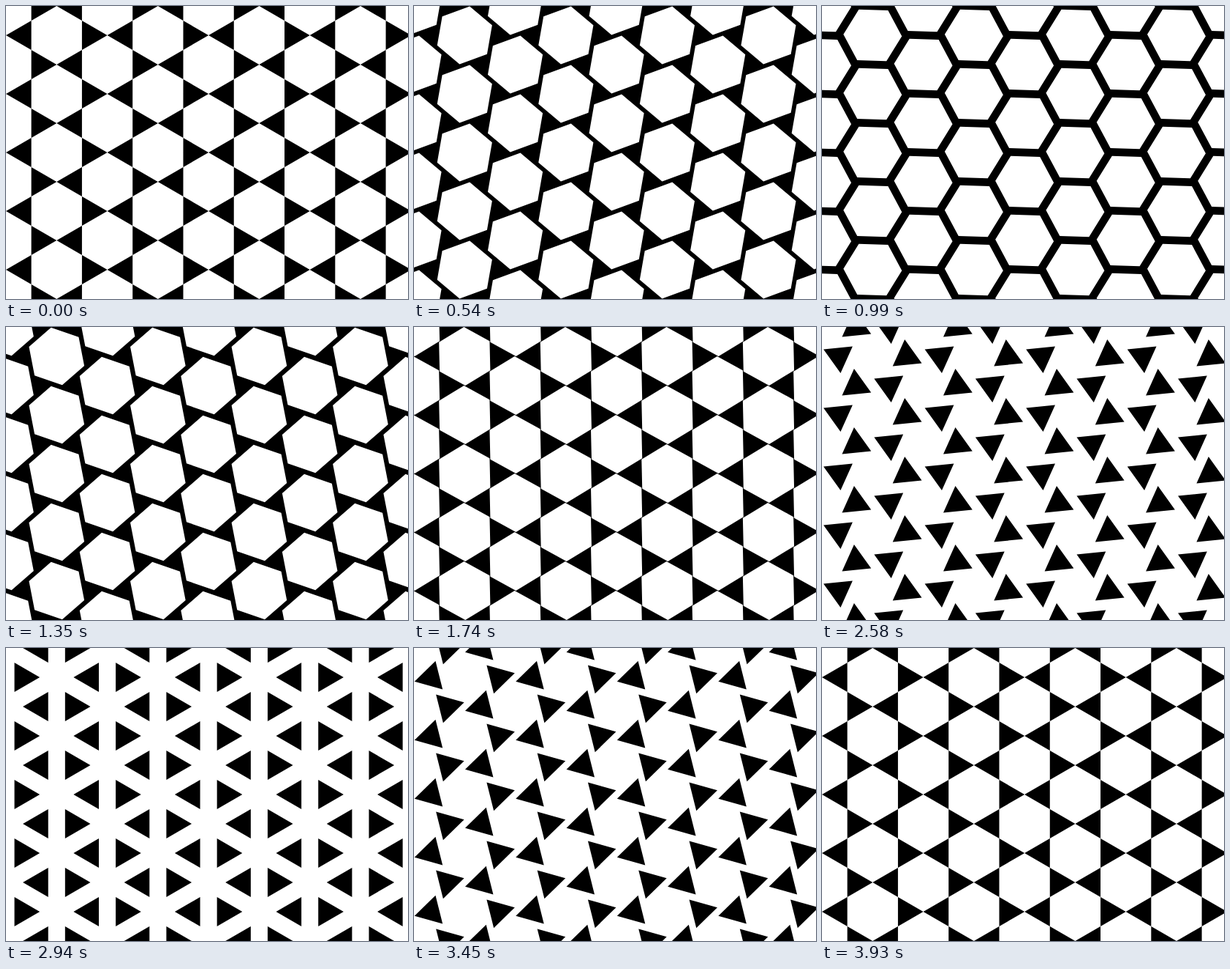
An HTML page that plays this animation: 550 px wide and 400 px high, repeating every 3.96 s.

```html
<!DOCTYPE html>
<html lang="en">
<head>
<meta charset="utf-8">
<title>Hexagons and triangles</title>
<style>
  html, body { margin: 0; width: 100%; height: 100%; overflow: hidden; background: #fff; }
  svg { display: block; width: 550px; height: 400px; }
</style>
</head>
<body>
<svg viewBox="0 0 550 400">
  <rect id="ground" width="550" height="400"/>
  <path id="tiles"/>
</svg>
<script>
const STEP = 30, LOOP = 3960, PHASE = LOOP / 2;
const SIDE = 40;
const COLUMN = SIDE * Math.sqrt(3);
const TRI_RADIUS = SIDE / Math.sqrt(3);
const ground = document.getElementById('ground');
const tiles = document.getElementById('tiles');

const hexCentres = [];
for (let i = -1; i <= 9; i++) {
  for (let j = -1; j <= 5; j++) {
    hexCentres.push([i * COLUMN, j * 2 * SIDE + (i % 2 ? SIDE : 0)]);
  }
}

const easeInOut = u => u < 0.5 ? 2 * u * u : 1 - 2 * (1 - u) ** 2;

function polygon(cx, cy, radius, sides, degrees) {
  let d = '';
  for (let k = 0; k < sides; k++) {
    const a = (degrees + k * 360 / sides) * Math.PI / 180;
    d += (k ? 'L' : 'M') + (cx + radius * Math.cos(a)).toFixed(3) +
      ' ' + (cy + radius * Math.sin(a)).toFixed(3);
  }
  return d + 'Z';
}

// White hexagons turn on black.
const hexagons = turn => hexCentres.map(([x, y]) =>
  polygon(x, y, SIDE, 6, 30 + 60 * turn)).join('');

// The black triangles left between them turn on white.
const triangles = turn => hexCentres.map(([x, y]) =>
  polygon(x - 2 * TRI_RADIUS, y, TRI_RADIUS, 3, 180 + 120 * turn) +
  polygon(x + 2 * TRI_RADIUS, y, TRI_RADIUS, 3, 120 * turn)).join('');

function draw(ms) {
  const t = (Math.floor(ms / STEP) * STEP + STEP) % LOOP;
  const hexPhase = t < PHASE;
  const turn = easeInOut((t % PHASE) / PHASE);
  ground.setAttribute('fill', hexPhase ? '#000' : '#fff');
  tiles.setAttribute('fill', hexPhase ? '#fff' : '#000');
  tiles.setAttribute('d', hexPhase ? hexagons(turn) : triangles(turn));
}

const start = performance.now();
function tick() {
  draw(performance.now() - start);
  requestAnimationFrame(tick);
}
tick();
</script>
</body>
</html>
```
